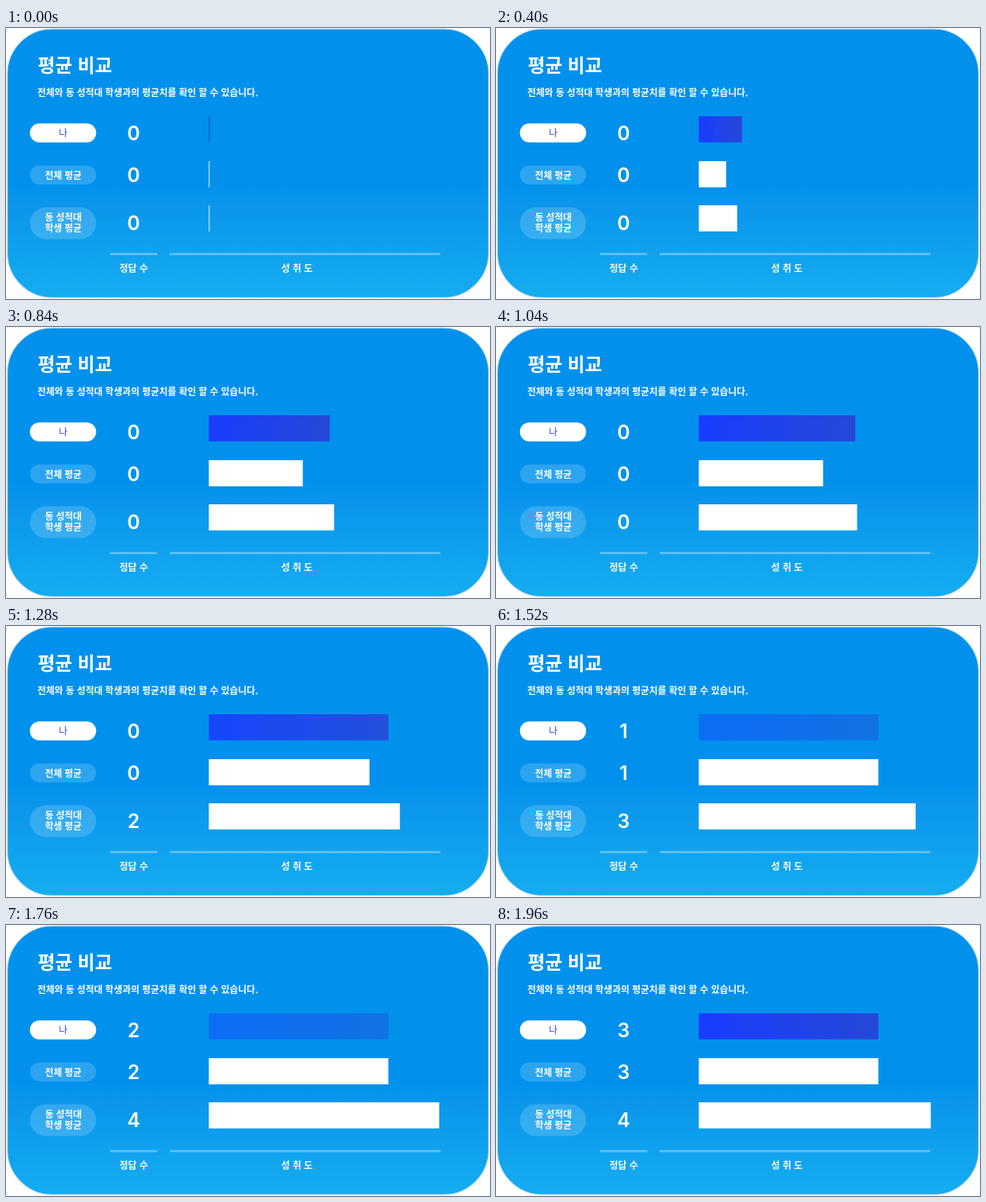
These frames come from a looping animation (624x350 px, 2000 ms). An HTML page:

```html
<!DOCTYPE html>
<html lang="ko">
<head>
<meta charset="utf-8">
<style>
  html, body { margin: 0; width: 100%; height: 100%; overflow: hidden; background: #fff; }
  svg { display: block; width: 624px; height: 350px; }
  text { font: 700 12px "Noto Sans CJK KR", "Noto Sans CJK", "Noto Sans KR", sans-serif; fill: #fff; }
  .title { font-size: 24.2px; }
  .mid { text-anchor: middle; }
  .foot { font-size: 12.2px; text-anchor: middle; }
  .count { font: 600 25px Inter, sans-serif; text-anchor: middle; }
</style>
</head>
<body>
<svg viewBox="0 0 624 350">
  <defs>
    <linearGradient id="sky" x1="0" y1="0" x2="0" y2="1">
      <stop offset="0" stop-color="#0191ed"/>
      <stop offset=".58" stop-color="#0191ed"/>
      <stop offset=".64" stop-color="#0a95ec"/>
      <stop offset="1" stop-color="#15adf0"/>
    </linearGradient>
    <linearGradient id="mine">
      <stop offset="0" stop-color="#1a3cff"/>
      <stop offset="1" stop-color="#2648d8"/>
    </linearGradient>
  </defs>
  <rect x="1.5" y="1" width="621" height="347.5" rx="58" fill="url(#sky)" stroke="#d9e6f0" stroke-width="1.5"/>

  <text class="title" x="41" y="56.7">평균 비교</text>
  <text x="40.5" y="88">전체와 동 성적대 학생과의 평균치를 확인 할 수 있습니다.</text>

  <rect x="30.8" y="123.3" width="85.4" height="24.4" rx="12.2" fill="#fff"/>
  <rect x="30.8" y="177.5" width="85.4" height="24.4" rx="12.2" fill="#fff" fill-opacity=".17"/>
  <rect x="30.8" y="231.5" width="85.4" height="41" rx="20.5" fill="#fff" fill-opacity=".17"/>
  <text class="mid" x="73.7" y="140.3" style="fill:#2742ee;font-weight:500">나</text>
  <text class="mid" x="73.9" y="194.7">전체 평균</text>
  <text class="mid" x="73.9" y="249">동 성적대</text>
  <text class="mid" x="73.9" y="263">학생 평균</text>

  <g fill="#fff" fill-opacity=".35">
    <rect x="134" y="290.6" width="61" height="2.7"/>
    <rect x="211" y="290.6" width="349" height="2.7"/>
  </g>
  <text class="foot" x="164.7" y="315">정답 수</text>
  <text class="foot" x="375" y="315">성 취 도</text>

  <g id="rows"></g>
</svg>
<script>
const LOOP = 2000, STEP = 40;

// Each row: bar width as [ms, px] points, and the times its counter goes up.
const rows = [
  { y: 114, base: 144.5, fill: 'url(#mine)', width: [[160, 1], [1171, 231.5]], ticks: [1400, 1640, 1880] },
  { y: 172, base: 198.5, fill: '#fff', width: [[225, 1], [1405, 231.5]], ticks: [1400, 1640, 1880] },
  { y: 229, base: 260.5, fill: '#fff', ticks: [1120, 1280, 1440, 1640],
    width: [[220, 1], [400, 49.5], [680, 123.5], [1040, 204], [1520, 279.5], [1760, 297], [1960, 299]] }
];
const fade = [[1240, 1], [1440, .42], [1800, .42], [1920, 1]];

function add(tag, attrs) {
  const el = document.createElementNS('http://www.w3.org/2000/svg', tag);
  for (const key in attrs) el.setAttribute(key, attrs[key]);
  return document.getElementById('rows').appendChild(el);
}

const slope = (a, b) => (b[1] - a[1]) / (b[0] - a[0]);

// Smooth curve through the points; two points alone give a straight line.
function curve(points, t) {
  const last = points.length - 1;
  if (t <= points[0][0]) return points[0][1];
  if (t >= points[last][0]) return points[last][1];
  const i = points.findIndex(p => p[0] > t) - 1;
  const a = points[i], b = points[i + 1], span = b[0] - a[0], u = (t - a[0]) / span;
  const here = slope(a, b);
  const before = i > 0 ? slope(points[i - 1], a) : here;
  const after = i + 1 < last ? slope(b, points[i + 2]) : here;
  const m0 = (before + here) / 2 * span, m1 = (here + after) / 2 * span;
  const v = 1 - u;
  return a[1] * v * v * (1 + 2 * u) + m0 * u * v * v + b[1] * u * u * (3 - 2 * u) - m1 * u * u * v;
}

function linear(points, t) {
  const i = points.findIndex(p => p[0] > t);
  if (i < 0) return points[points.length - 1][1];
  if (i === 0) return points[0][1];
  return points[i - 1][1] + slope(points[i - 1], points[i]) * (t - points[i - 1][0]);
}

for (const row of rows) {
  row.bar = add('rect', { x: 261.5, y: row.y, height: 33.7, fill: row.fill });
  row.label = add('text', { class: 'count', x: 164.5, y: row.base });
}

function draw(t) {
  for (const row of rows) {
    row.bar.setAttribute('width', curve(row.width, t));
    row.label.textContent = row.ticks.filter(at => t >= at).length;
  }
  rows[0].bar.setAttribute('opacity', linear(fade, t));
}

const start = performance.now();
function frame() {
  const t = (performance.now() - start) % LOOP;
  draw(Math.floor(t / STEP) * STEP);
  requestAnimationFrame(frame);
}
frame();
</script>
</body>
</html>
```
